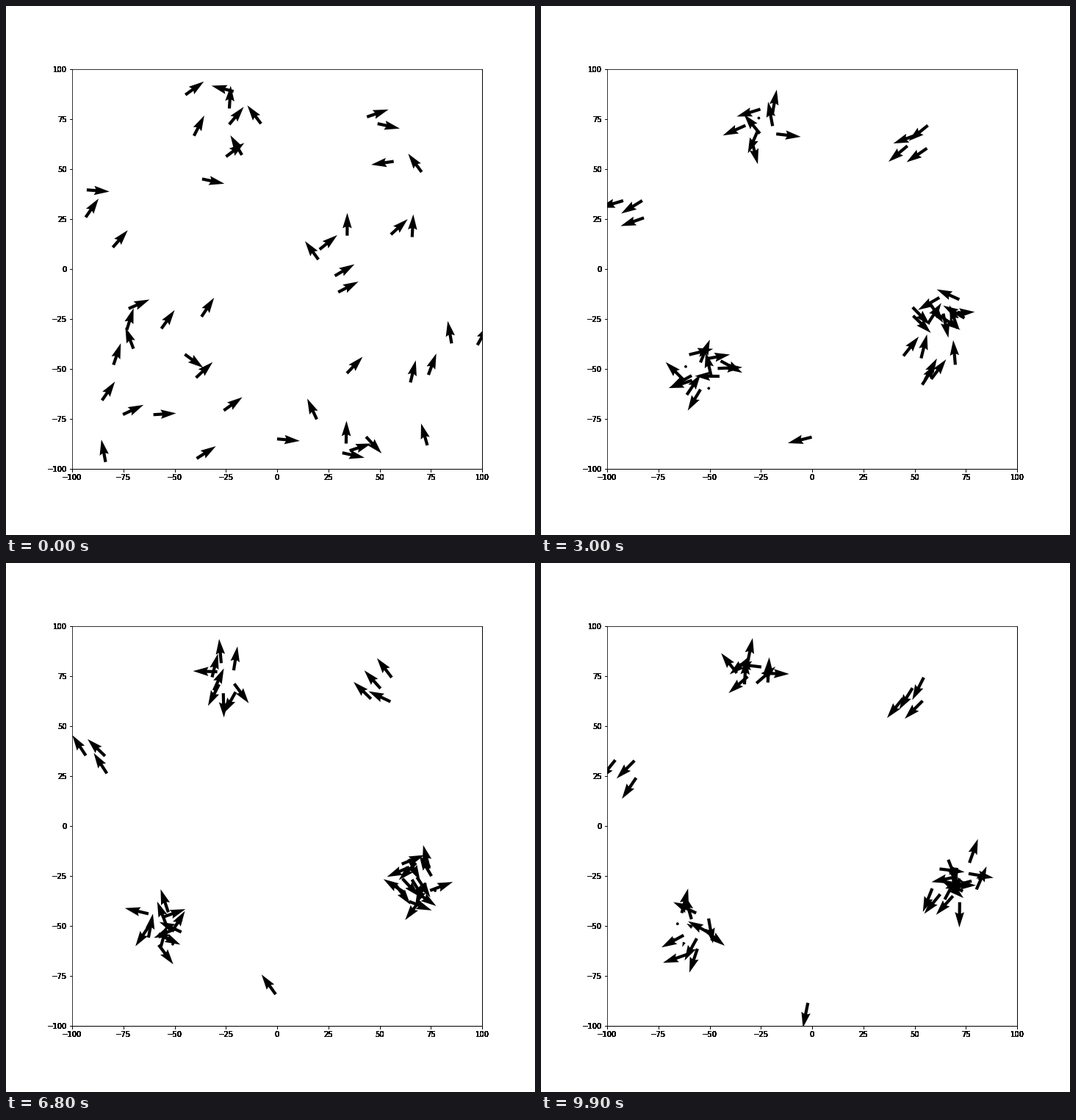
A matplotlib script for the animation above (10000 ms loop, 720 by 720 pixels).

```python
import numpy as np
import matplotlib.pyplot as plt
from matplotlib.animation import FuncAnimation

FRAMES, SPEED, REACH = 100, 1.35, 6

# birds, start box centre and half size, gathering point, its radius and drift
FLOCKS = [
    (3, (-83, 26), (14, 16), (-84, 33), 9, (-5, 0)),
    (9, (-24, 64), (28, 26), (-24, 72), 9, (-5, 5)),
    (4, (58, 62), (17, 18), (56, 66), 9, (-3, 4)),
    (18, (58, -33), (40, 62), (67, -25), 12, (3, -3)),
    (14, (-56, -58), (34, 40), (-54, -52), 11, (-5, -1)),
    (1, (0, -85), (0, 0), (2, -84), 0, (-3, -3)),
]
SMALL = 4  # flocks up to this size turn together

# common heading of the small flocks, in degrees
TURN_TIMES = [0, 18, 30, 45, 68, 85, 99]
TURNS = [-5, 150, 205, 330, 137, 232, 228]


def scatter(rng):
    """Start, home and drift of every bird, and whether its flock is small."""
    start, home, drift, small = [], [], [], []
    for n, box, half, centre, radius, shift in FLOCKS:
        start.append(rng.uniform(-1, 1, (n, 2)) * half + box)
        k = np.arange(n)
        angle = k * 2.4 + rng.uniform(0, 6.28)  # sunflower layout
        r = radius * np.sqrt((k + 0.5) / n)
        home.append(np.c_[r * np.cos(angle), r * np.sin(angle)] + centre)
        drift.append(np.tile(shift, (n, 1)))
        small.append(np.full(n, n <= SMALL))
    return tuple(map(np.concatenate, (start, home, drift, small)))


def direction(angle):
    return np.c_[np.cos(angle), np.sin(angle)]


def simulate():
    rng = np.random.default_rng(11)
    pos, home, drift, small = scatter(rng)
    n = len(pos)
    head = np.radians(rng.normal(60, 50, n))
    head[-1] = np.radians(TURNS[0])
    states = [(pos, direction(head))]
    for i in range(1, FRAMES):
        gap = home + drift * max(0, i - 50) / 50 - pos
        far = np.hypot(*gap.T) > REACH

        turn = np.radians(np.interp(i, TURN_TIMES, TURNS))
        wander = np.where(small, turn + rng.normal(0, 0.2, n),
                          head + rng.normal(0, 0.8, n))
        head = np.where(far, np.arctan2(gap[:, 1], gap[:, 0]), wander)

        # birds that have arrived often pause at first
        moving = far | small | (rng.random(n) < min(0.9, (i / 30) ** 1.5))
        size = np.where(moving, 1, 0.5 * rng.random(n) ** 2)
        vel = direction(head) * size[:, None]
        pos = pos + SPEED * np.where(far[:, None], vel, 0.35 * vel + 0.15 * gap)
        states.append((pos, vel))
    return states


def add_axes(fig, z):
    ticks = range(-100, 101, 25)
    ax = fig.add_axes([0.125, 0.125, 0.775, 0.755], zorder=z, label=f"axes{z}")
    ax.set(xlim=(-100, 100), ylim=(-100, 100), xticks=ticks, yticks=ticks)
    return ax


def thicken_labels(ax, copies):
    """Stack copies of the tick labels until their soft edges turn black."""
    xt, xva, xha = ax.get_xaxis_text1_transform(7)
    yt, yva, yha = ax.get_yaxis_text1_transform(7)
    for v in ax.get_xticks():
        label = f"{v:.0f}".replace("-", "\u2212")
        for _ in range(copies):
            ax.text(v, 0, label, transform=xt, va=xva, ha=xha)
            ax.text(0, v, label, transform=yt, va=yva, ha=yha)


states = simulate()
fig = plt.figure(figsize=(10, 10), dpi=72, facecolor="white")
ax = [add_axes(fig, z) for z in range(4)][-1]
thicken_labels(ax, 12)
arrows = ax.quiver(*states[0][0].T, *states[0][1].T, color="black")


def update(i):
    pos, vel = states[i]
    arrows.set_offsets(pos)
    arrows.set_UVC(*vel.T)
    arrows.scale = None  # rescale to the mean speed
    return arrows,


anim = FuncAnimation(fig, update, frames=FRAMES, interval=100, repeat=True,
                     repeat_delay=0, blit=False)
plt.show()
```
